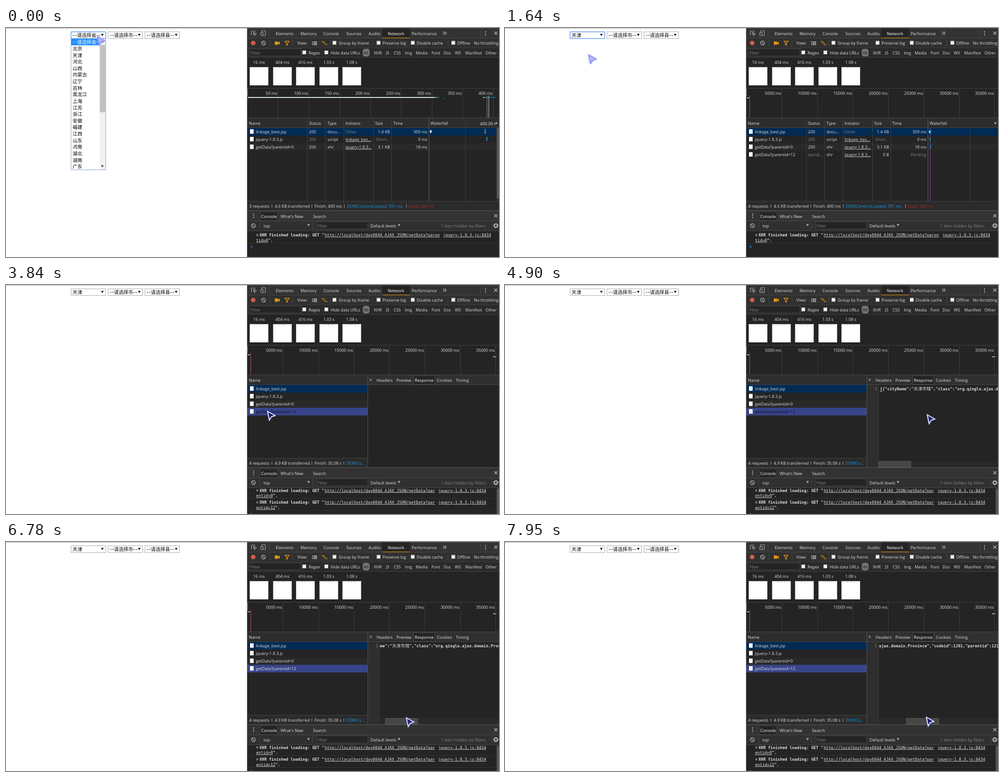
An HTML page for the animation above (8000 ms loop, 1095x511 px).

```html
<!DOCTYPE html>
<html lang="en">
<head>
<meta charset="utf-8">
<title>Linked selects with network panel</title>
<style>
html, body { margin: 0; width: 100%; height: 100%; overflow: hidden; background: #fff; }
svg { display: block; }
#stage { position: absolute; left: 0; top: 0; }
text { font: 9.2px "Open Sans", "Noto Sans", sans-serif; fill: #dfdfdf; white-space: pre; }
.cn { font: 10.67px Inter, "Noto Sans CJK SC", "Noto Sans CJK", sans-serif; fill: #000; }
.mono { font: 8.86px "DejaVu Sans Mono", "Noto Sans CJK SC", monospace; }
.bold { font-weight: bold; }
.zh { font: 9.6px "Noto Sans CJK SC", "Noto Sans CJK", sans-serif; }
.end { text-anchor: end; }
.mid { text-anchor: middle; }
.dim { fill: #858585; }
.link { text-decoration: underline; }
.white { fill: #fff; }
.ink { fill: #0b0f28; }
.blue { fill: #0f9bea; }
.red { fill: #b5261b; }
.alert { fill: #e01010; }
.glow { filter: drop-shadow(0 0 2px #a9a6ff); }
.halo { filter: drop-shadow(0 0 1px #5b55e0); }
</style>
</head>
<body>
<svg id="stage" width="1095" height="511" viewBox="0 0 1095 511"></svg>
<script>
const LOOP = 8000;
const rules = [];
const pct = ms => ms / LOOP * 100 + '%';

const text = (x, y, s, cls = '') => `<text x="${x}" y="${y}" class="${cls}">${s}</text>`;
const rect = (x, y, w, h, fill, more = '') =>
  `<rect x="${x}" y="${y}" width="${w}" height="${h}" fill="${fill}" ${more}/>`;
const path = (d, fill, stroke = 'none', w = 1, more = '') =>
  `<path d="${d}" fill="${fill}" stroke="${stroke}" stroke-width="${w}" ${more}/>`;
const vline = (x, y1, y2, c = '#3f3f3f') => rect(x, y1, 1, y2 - y1, c);
const hline = (y, c = '#444', x = 536, w = 559) => rect(x, y, w, 1, c);
const box = (x, y, w, h, fill, stroke) =>
  rect(x + .5, y + .5, w - 1, h - 1, fill, `stroke="${stroke}"`);
const down = (x, y, s, c) => path(`M${x - s} ${y - s * .8}h${2 * s}l${-s} ${s * 1.7}z`, c);
const cross = (x, y, s = 3.5, c = '#c4c4c4') =>
  path(`M${x - s} ${y - s}l${2 * s} ${2 * s}m0 ${-2 * s}l${-2 * s} ${2 * s}`, 'none', c, 1.2);
const kebab = (x, y) => [-4, 0, 4].map(d => rect(x - 1, y + d - 1, 2, 2, '#bbb')).join('');
const ban = (x, y) => path(`M${x - 4.5} ${y}a4.5 4.5 0 1 1 9 0a4.5 4.5 0 1 1 -9 0M${x - 3} ${y - 3}l6 6`, 'none', '#aaa', 1.4);
const check = (x, y) => box(x, y, 9, 9, '#f2f2f2', '#8a8a8a');
const row = (y, items) => items.map(([x, s, cls]) => text(x, y, s, cls)).join('');

// Layer that is visible from a to b (ms)
function show(a, b, inner) {
  const id = `on${a}_${b}`;
  rules.push(`@keyframes ${id}{0%{visibility:hidden}${pct(a)}{visibility:visible}${pct(b)}{visibility:hidden}}
.${id}{animation:${id} ${LOOP}ms step-end infinite}`);
  return `<g class="${id}">${inner}</g>`;
}

// Layer that moves linearly through [ms, x, y] points
function move(id, points, inner) {
  const keys = points.map(([t, x, y]) => `${pct(t)}{transform:translate(${x}px,${y}px)}`);
  rules.push(`@keyframes ${id}{${keys.join('')}}.${id}{animation:${id} ${LOOP}ms linear infinite}`);
  return `<g class="${id}">${inner}</g>`;
}

// ---- Web page ----
const PROVINCES = '--请选择省-- 北京 天津 河北 山西 内蒙古 辽宁 吉林 黑龙江 上海 江苏 浙江 安徽 福建 江西 山东 河南 湖北 湖南 广东'.split(' ');
const itemY = i => 24 + i * 14.63;
const option = (i, cls) => text(148, itemY(i) + 11.3, PROVINCES[i], 'cn ' + cls);
const hover = i => rect(145, itemY(i), 63, 14.63, '#1e90ff') + option(i, 'white');
const select = (x, s) => box(x, 8, 78, 16, '#fff', '#a6a6a6') + down(x + 70, 15.5, 3, '#222') + (s ? text(x + 4, 20, s, 'cn') : '');

const page =
  rect(0, 0, 536, 511, '#fff') + hline(0, '#a3a3a3', 0, 535) +
  select(144) + select(226, '--请选择市--') + select(308, '--请选择县--') +
  show(0, 1550, text(148, 20, PROVINCES[0], 'cn')) +
  show(1550, LOOP, text(148, 20, PROVINCES[2], 'cn')) +
  show(0, 3430, rect(144.5, 8.5, 77, 15, 'none', 'rx="1" stroke="#5a92e6" stroke-width="1.4"')) +
  show(0, 1400,
    box(144, 23, 78, 294, '#fff', '#7f9fd6') +
    PROVINCES.map((_, i) => option(i)).join('') +
    rect(208, 24, 13, 292, '#f1f1f1') + rect(208.5, 38, 12, 150, '#c1c1c1') +
    path('M211 33l3-3.5l3 3.5z', '#8a8a8a') + down(214, 308.5, 3, '#505050')) +
  show(0, 680, hover(0)) + show(680, 930, hover(1)) + show(930, 1400, hover(2));

// ---- Toolbars ----
const AMBER = '#e0930f';
const ACTIVE = '#242424';
const tabs =
  rect(536, 0, 559, 511, '#242424') + rect(536, 1, 559, 22, '#333') + hline(0, '#4a4a4a') +
  path('M553 9v-2h-8v8h2M549 10l7 3l-3 1l-1 3z', 'none', '#aaa', 1.2) +
  path('M568 11v-5h8v11h-4M566 10h5v7h-5z', 'none', '#aaa', 1.2) +
  vline(584, 4, 19, '#4a4a4a') + rect(836, 1, 61, 21, ACTIVE) +
  row(16, [[599, 'Elements'], [654, 'Memory'], [705, 'Console'], [756, 'Sources'],
    [805, 'Audits'], [848, 'Network', 'white'], [901, 'Performance']]) +
  path('M971 8l3 3.5l-3 3.5m4-7l3 3.5l-3 3.5', 'none', '#bbb', 1.2) +
  vline(1054, 4, 19, '#4a4a4a') + kebab(1065, 12) + cross(1088, 11.5) +
  hline(22, '#484848') + rect(836, 21.5, 61, 1.2, AMBER);

const tools =
  rect(536, 23, 559, 22, '#303030') + rect(536, 45, 559, 20, '#2a2a2a') +
  '<circle cx="549" cy="33.5" r="5" fill="#cf5f4c"/>' + ban(572, 33.5) +
  [586, 637, 719, 981].map(x => vline(x, 26, 41, '#484848')).join('') +
  path('M597 30h7v2.2l4-2v7l-4-2v2.2h-7z', AMBER) +
  path('M619.5 29.5h9.5l-3.7 4.5v4h-2.2v-4z', 'none', AMBER, 1.4) +
  text(647, 37, 'View:') +
  [30, 33, 36].map(y => rect(680, y, 2, 2, '#aaa') + rect(683, y, 8, 2, '#aaa')).join('') +
  path('M701 30.5h6m-3 3h6m-2 3.5h6', 'none', AMBER, 1.6) +
  [725, 823, 899, 989].map(x => check(x, 28.5)).join('') +
  row(37, [[739, 'Group by frame'], [836, 'Preserve log'], [912, 'Disable cache'],
    [1002, 'Offline'], [1039, 'No throttling']]) +
  hline(44, '#3c3c3c') + box(539, 46, 117, 17, '#242424', '#4d4d4d') +
  text(543, 58.5, 'Filter', 'dim') + check(658, 50) + check(707, 50) +
  rect(792.5, 46.5, 15, 17, '#777', 'rx="5"') +
  row(59, [[672, 'Regex'], [721, 'Hide data URLs'], [794.5, 'All', 'ink'], [817, 'XHR'], [844, 'JS'],
    [861, 'CSS'], [886, 'Img'], [910, 'Media'], [945, 'Font'], [972, 'Doc'], [997, 'WS'],
    [1020, 'Manifest'], [1065, 'Other']]) +
  hline(65);

const film = ['16 ms', '404 ms', '416 ms', '1.03 s', '1.08 s'].map((s, i) => {
  const x = Math.round(541 + i * 51.5);
  return text(x + 21, 80, s, 'mid') + rect(x, 87, 42, 41, '#fff') +
    path(`M${x + .5} 128v-40.5h41v40.5`, 'none', '#b4b0b2') +
    (i ? path(`M${x + 11} 89.5h5m2 0h5m2 0h5`, 'none', '#c9c4cc', 1) : '');
}).join('') + hline(134);

// ---- Timeline overview ----
const scale = (first, gap, n, unit) => Array.from({ length: n }, (_, i) => {
  const x = first + i * gap;
  return vline(Math.round(x), 136, 200) + text(x - 1.5, 149, (i + 1) * unit + ' ms', 'end');
}).join('');

const overview =
  show(0, 1550,
    scale(604, 68.3, 8, 50) + rect(537, 154, 414, 2, '#dcebea') + rect(951, 154, 4, 2, '#c9b45a') +
    rect(955, 154, 7, 2, '#1c7f96') + rect(973, 156.5, 2, 2, '#0f8fd6') +
    rect(1060, 154, 3, 2, '#ddd') + rect(1063, 154, 24, 2, '#1b6f83') +
    vline(1068, 151, 200, '#999') + vline(1072, 151, 200, '#ddd')) +
  show(1550, LOOP,
    scale(615, 78.7, 7, 5000) + rect(537, 155, 5, 1.5, '#e6e6e6') + vline(543, 151, 200, '#b0605a')) +
  show(1920, LOOP, rect(1082, 159.5, 5, 1.5, '#e6e6e6') + rect(1087, 159.5, 3, 1.5, '#18a3c4')) +
  vline(536, 136, 152, '#888') + hline(200, '#4a4a4a');

// ---- Request table ----
const rowY = i => 223 + i * 17;
const FILES = ['linkage_best.jsp', 'jquery-1.8.3.js', 'getData?parentid=0', 'getData?parentid=12'];
const rowBack = (i, c) => rect(536, rowY(i), 559, 17, c);
const fileName = (i, cls) => rect(542, rowY(i) + 3, 8, 10, '#fff') + text(555, rowY(i) + 12, FILES[i], cls);
const cells = (i, [status, type, from, size, time], dim = '') => row(rowY(i) + 12, [
  [673, status, i == 1 ? 'dim' : dim], [714, type], [754, from, i ? 'link' : 'dim'],
  [853, size, i == 1 ? 'end dim' : 'end'], [936, time, 'end ' + dim]]);
const JQ = 'jquery-1.8.3...';

const table =
  rect(536, 201, 559, 21, '#2d2d2d') + text(539.5, 215.5, 'Name') + hline(222) +
  rowBack(0, '#002b55') + rowBack(2, '#292929') +
  show(2850, 3050, rowBack(2, '#16263e')) + show(3050, 3840, rowBack(3, '#16263e')) +
  show(3840, LOOP, rowBack(3, '#38458a')) +
  [0, 1, 2].map(i => fileName(i)).join('') +
  show(1550, 3840, fileName(3)) + show(3840, 6320, fileName(3, 'ink')) + show(6320, LOOP, fileName(3)) +
  show(0, 3840,
    [669, 709, 750, 816, 856].map(x => vline(x, 201, 386, '#414141')).join('') + vline(939, 201, 386, '#6a6a6a') +
    row(215.5, [[673, 'Status'], [714, 'Type'], [754, 'Initiator'], [820, 'Size'], [860, 'Time'], [943, 'Waterfall']]) +
    path('M1086 214l3-5l3 5z', '#aaa') +
    cells(0, ['200', 'docu...', 'Other', '1.4 KB', '309 ms']) +
    cells(1, ['200', 'script', 'linkage_bes...', '(from...', '0 ms']) +
    cells(2, ['200', 'xhr', JQ, '3.1 KB', '18 ms'])) +
  show(0, 1550,
    vline(1020, 201, 386) + `<svg x="1050" y="203" width="37" height="17">${text(3, 14, '400.00 ms')}</svg>` +
    rect(1089, 223, 6, 163, '#2e2e2e') + rect(1090, 223, 5, 158, '#555') +
    rect(942, 228, 3, 6, '#fff') + rect(1062, 226, 1, 10, '#7a7431') + rect(1064, 226, 2, 10, '#1596e0') +
    rect(1067, 243, 2, 9, '#1596e0')) +
  show(1550, 3840,
    vline(1033, 223, 386) + vline(944, 223, 386, '#8b4e8d') +
    rect(942, 229, 2, 5, '#fff') + rect(944, 227, 2, 9, '#1596e0') +
    rect(943, 244, 2, 8, '#1596e0') + rect(944, 261, 2, 8, '#3c7fd0')) +
  show(1550, 1920, cells(3, ['(pend...', 'xhr', JQ, '0 B', 'Pending'], 'dim')) +
  show(1920, 3840, cells(3, ['200', 'xhr', JQ, '340 B', '350 ms']));

// ---- Summary bar ----
const bar = x => text(x, 401, 'I');
const timing = (x, cls) => row(401, [
  [x, 'DOMContentLoaded: 391 ms', 'blue'], [x + 131, 'I'], [x + 137, 'Load: 388 ms', cls]]);
const summary =
  rect(536, 386, 559, 21, '#2b2b2b') + hline(386) + bar(589.5) + bar(678) +
  show(0, 1550, text(540, 401, '3 requests')) + show(1550, LOOP, text(540, 401, '4 requests')) +
  show(0, 1920, row(401, [[597, '4.6 KB transferred'], [685, 'Finish: 400 ms'], [750, 'I']]) + timing(757, 'red')) +
  show(1920, LOOP, row(401, [[597, '4.9 KB transferred'], [685, 'Finish: 35.08 s'], [749, 'I']])) +
  show(1920, 3840, timing(756, 'alert')) +
  show(3840, LOOP, text(756, 401, 'DOMCo...', 'blue'));

// ---- Response pane ----
const SCROLL = [[0, 0], [6240, 0], [7090, 21], [7320, 25], [7400, 27], [7500, 27], [7950, 62], [LOOP, 62]];
const json = `[{"cityName":"<tspan class="zh">天津市辖</tspan>","class":"org.qinglu.ajax.domain.Province","codeid":1201,"parentid":12},{"cityName":`;
const detail =
  show(3840, LOOP,
    rect(803, 201, 292, 206, '#242424') + rect(803, 201, 292, 21, '#303030') +
    hline(222, '#484848', 803, 292) + vline(803, 201, 407, '#555') +
    box(905, 202, 48, 20, ACTIVE, '#4c4c4c') + cross(810, 211.5, 2.3, '#999') +
    row(215.8, [[823, 'Headers'], [867, 'Preview'], [908, 'Response', 'white'], [957, 'Cookies'], [999, 'Timing']])) +
  show(3980, LOOP,
    rect(804, 223, 25, 184, '#2e2e2e') + vline(829, 223, 407, '#3a3a3a') + text(821, 235, '1', 'mono dim') +
    `<svg x="830" y="223" width="265" height="170">${move('scroll', SCROLL.map(([t, x]) => [t, -x * 3.75, 0]),
      text(3, 12, json, 'mono bold') + rect(3, 14, 5, 1, '#ccc'))}</svg>` +
    rect(830, 393, 265, 14, '#292929') +
    move('thumb', SCROLL.map(([t, x]) => [t, x, 0]), box(829, 393, 73, 14, '#464646', '#5a5a5a')));

// ---- Console drawer ----
const URL_HEAD = 'http://localhost/day6044_AJAX_JSON/getData?par';
const message = (y, linkX, first, rest) =>
  path(`M556.5 ${y - 6}l5 3l-5 3z`, '#8a8a8a') + text(563, y, 'XHR finished loading: GET "', 'mono bold') +
  text(708, y, first, 'mono link') + text(linkX, y, 'jquery-1.8.3.js:8434', 'mono link') +
  `<text x="555.5" y="${y + 11.5}" class="mono"><tspan class="link">${rest}</tspan><tspan class="bold">".</tspan></text>`;
const prompt = y => path(`M544 ${y - 2.5}l3 2.5l-3 2.5`, 'none', '#1a8cff', 1.4);

const drawer =
  hline(407, '#5a5a5a') + rect(536, 408, 559, 22, '#333') + kebab(550, 419) +
  box(565, 410, 38, 20, ACTIVE, '#3c3c3c') +
  row(423.5, [[567, 'Console', 'white'], [610, 'What\'s New'], [682, 'Search']]) + cross(1088, 419) +
  hline(430, '#484848') + rect(536, 431, 559, 21, '#303030') + ban(549.5, 441) +
  vline(563, 433, 449, '#484848') + vline(680, 433, 449, '#484848') +
  down(672, 440, 3, '#aaa') + box(689, 432, 115, 17, '#242424', '#484848') + down(873, 440, 3, '#aaa') +
  row(444.5, [[572, 'top'], [692, 'Filter', 'dim'], [809.5, 'Default levels'], [966.5, '1 item hidden by filters', 'dim']]) +
  vline(1079, 433, 449, '#484848') +
  '<circle cx="1088" cy="441" r="3.4" fill="none" stroke="#b0b0b0" stroke-width="2.4"/>' +
  '<circle cx="1088" cy="441" r="5" fill="none" stroke="#b0b0b0" stroke-width="1.6" stroke-dasharray="2 1.93"/>' +
  hline(452, '#484848') +
  show(0, 1920, message(465, 971, URL_HEAD + 'en', 'tid=0') + hline(480, '#333') + prompt(488)) +
  show(1920, LOOP,
    message(461.5, 960, URL_HEAD, 'entid=0') + hline(476, '#333') +
    message(488, 960, URL_HEAD, 'entid=12') + hline(503, '#333') + prompt(511.5) +
    rect(1089, 453, 6, 58, '#2e2e2e') + rect(1090, 455, 5, 56, '#555')) +
  vline(535, 0, 511, '#888');

// ---- Pointer ----
const ARROW = 'M-1 -1L15.5 8.5L7.5 11L3 18.5Z';
const pointer = move('pointer', [
  [0, 204, 20], [360, 204, 20], [1070, 187, 61], [1700, 187, 61], [2480, 446, 222],
  [2970, 562, 278], [3200, 582, 283], [4120, 582, 283], [4500, 760, 250], [4900, 939, 291],
  [5060, 939, 250], [5430, 881, 375], [5560, 877, 378], [6160, 877, 392], [6240, 877, 392],
  [7090, 898, 394], [7320, 902, 395], [7400, 903, 395], [7500, 903, 395], [7950, 937, 392], [LOOP, 937, 392]],
  show(0, 1780, path(ARROW, '#b9b8ff', '#8c8df0', 2, 'class="glow" stroke-linejoin="round"')) +
  show(1780, LOOP, path(ARROW, '#1b1d76', '#eceaff', 2, 'class="halo"')));

const scene = page + tabs + tools + film + overview + table + summary + detail + drawer + pointer;
const sheet = document.createElement('style');
sheet.textContent = [...new Set(rules)].join('\n');
document.head.append(sheet);
document.getElementById('stage').innerHTML = scene;
</script>
</body>
</html>
```
